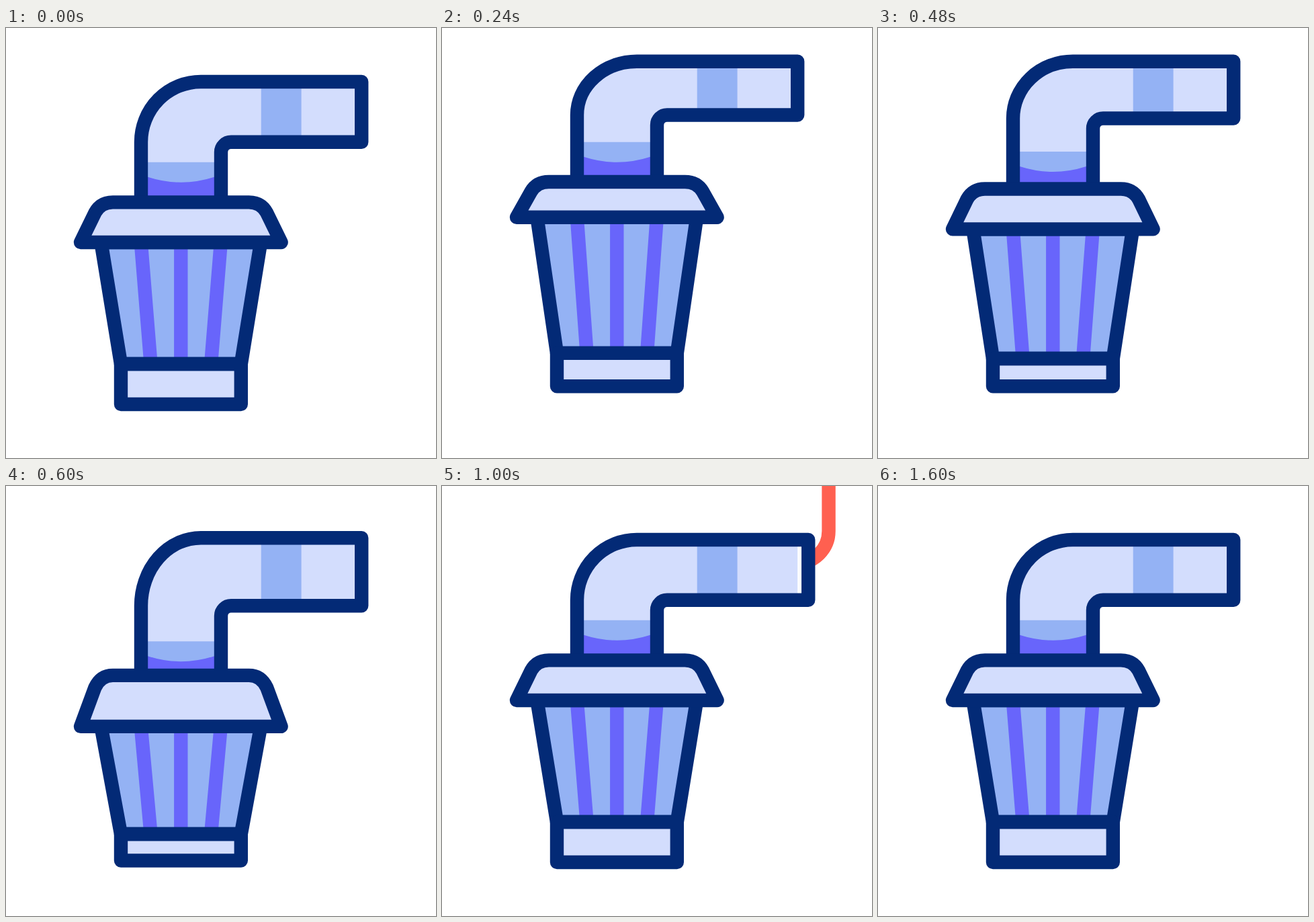
An HTML page that plays this animation: 640x640 px, repeating every 2000 ms.

```html
<!DOCTYPE html>
<html lang="en">
<head>
<meta charset="utf-8">
<title>Cup and pipe</title>
<style>
  html, body { margin: 0; width: 100%; height: 100%; overflow: hidden; background: #fff; }
  svg { display: block; width: 100vw; height: 100vh; }
  .line { fill: none; stroke: #032a76; stroke-width: 20.4; stroke-linejoin: round; }
  .light { fill: #d3ddfd; }
  .mid { fill: #94b2f4; }
  .deep { fill: #6865fb; }
  .stripe { fill: none; stroke: #6865fb; stroke-width: 20.4; }
  .jet { fill: none; stroke: #ff6050; stroke-width: 20.4; }
</style>
</head>
<body>
<svg viewBox="0 0 640 640">
  <defs><clipPath id="outside"><rect id="edge" y="0" width="200" height="640"/></clipPath></defs>
  <g clip-path="url(#outside)"><path id="jet" class="jet" pathLength="1"/></g>
  <path id="pipeFill" class="light"/>
  <path id="band" class="mid"/>
  <path id="water" class="mid"/>
  <path id="syrup" class="deep"/>
  <path id="pipe" class="line"/>
  <path id="cupFill" class="mid"/>
  <path id="stripes" class="stripe"/>
  <path id="baseFill" class="light"/>
  <path id="cup" class="line"/>
  <path id="base" class="line"/>
  <path id="collarFill" class="light"/>
  <path id="collar" class="line"/>
</svg>
<script>
const LOOP = 2000, STEP = 40;
const el = id => document.getElementById(id);
const draw = (id, d) => el(id).setAttribute('d', d);

// Smooth progress from time a to time b
function ease(t, a, b) {
  const u = Math.min(1, Math.max(0, (t - a) / (b - a)));
  return u * u * (3 - 2 * u);
}

// Height of each level: at rest, shift when stretched, shift when squashed
const LEVELS = {
  top: [80, -50, 0],
  under: [169.7, -66.4, 12.9],
  liquid: [199.7, -49.2, 36.2],
  rim: [259.4, -50.2, 26.7],
  brim: [319, -61.4, 44.8],
  floor: [500, -26.6, 20.6],
  foot: [560, -44, 0]
};

function pose(t) {
  const up = ease(t, 80, 360), down = ease(t, 360, 640), back = ease(t, 640, 800);
  const y = {};
  for (const k in LEVELS) {
    const [rest, high, low] = LEVELS[k];
    y[k] = rest + high * (up - down) + low * (down - back);
  }
  return y;
}

function pipePath(y, right) {
  return `M201 ${y.rim}V${y.under}A89 ${y.under - y.top} 0 0 1 290 ${y.top}` +
    `H${right}V${y.under}H335A15 15 0 0 0 320 ${y.under + 15}V${y.rim}`;
}

function drawJet(t, mouth) {
  const on = t > 800 && t < 1600;
  el('jet').style.display = on ? '' : 'none';
  if (!on) return;
  const left = 1 - ease(t, 800, 1080);
  const dx = -136 * left, dy = -151 * left;
  draw('jet', `M${520 + dx} ${145 + dy}H${554.5 + dx}` +
    `A48 48 0 0 0 ${602.5 + dx} ${97 + dy}V-10`);
  el('jet').setAttribute('stroke-dasharray', '1 2');
  el('jet').setAttribute('stroke-dashoffset', -ease(t, 1320, 1600));
  el('edge').setAttribute('x', mouth);
}

function render(t) {
  const y = pose(t);
  const mouth = 529.2 + 20 * (ease(t, 800, 1080) - ease(t, 1080, 1360));
  drawJet(t, mouth);

  draw('pipeFill', pipePath(y, 529.2) + 'Z');
  draw('band', `M379.7 ${y.top}H439.6V${y.under}H379.7Z`);
  draw('water', `M201 ${y.liquid}H320V${y.rim}H201Z`);
  const s = y.liquid + 22;
  draw('syrup', `M201 ${s - 3}L211 ${s}Q260.5 ${s + 16} 310 ${s}L320 ${s - 3}V${y.rim}H201Z`);
  draw('pipe', pipePath(y, mouth));

  const cup = `M141.4 ${y.brim}L171 ${y.floor}H349.8L379.2 ${y.brim}Z`;
  draw('cupFill', cup);
  draw('cup', cup);
  draw('stripes', `M200.8 ${y.brim}L215.5 ${y.floor}M260.3 ${y.brim}V${y.floor}` +
    `M319.8 ${y.brim}L305.1 ${y.floor}`);

  const base = `M171 ${y.floor}H349.8V${y.foot}H171Z`;
  draw('baseFill', base);
  draw('base', base);

  const h = y.brim - y.rim, bend = y.rim + 15.5 + (h - 59.5) * 0.15;
  const curve = y.rim + (bend - y.rim) * 0.36;
  const collar = `M111 ${y.brim}L132.5 ${bend}C138 ${curve} 147 ${y.rim} 159 ${y.rim}` +
    `H361.6C373.6 ${y.rim} 382.6 ${curve} 388.1 ${bend}L409.6 ${y.brim}Z`;
  draw('collarFill', collar);
  draw('collar', collar);
}

const start = performance.now();
function tick() {
  const t = (performance.now() - start) % LOOP;
  render(Math.floor(t / STEP) * STEP);
  requestAnimationFrame(tick);
}
tick();
</script>
</body>
</html>
```
